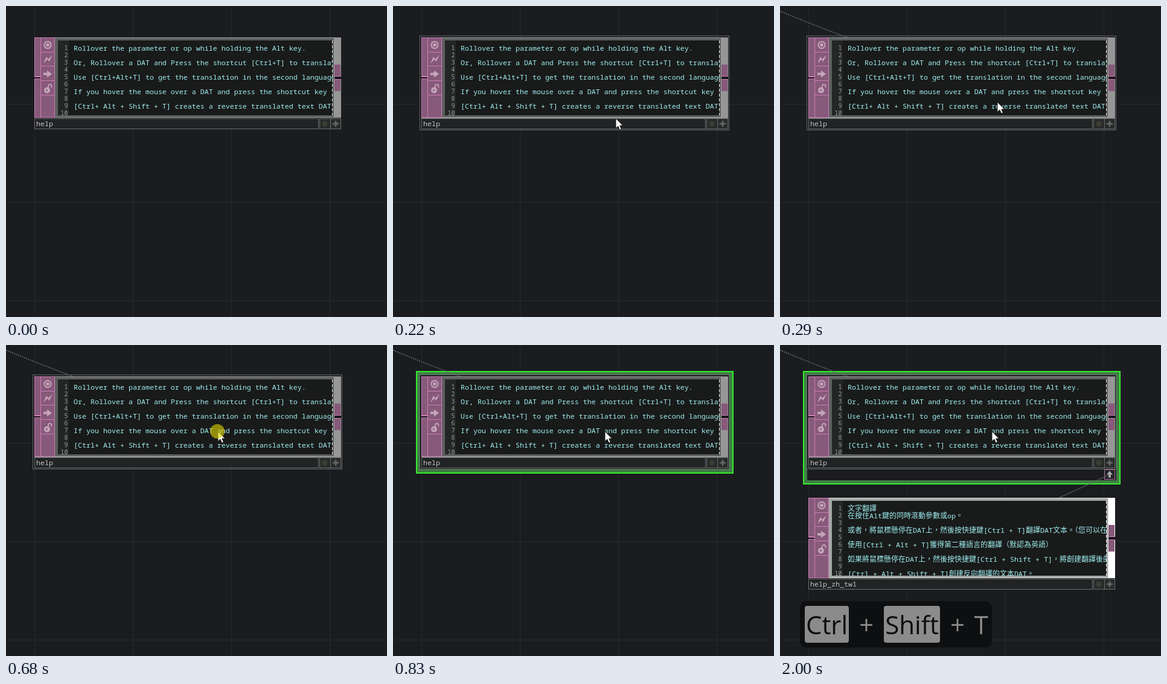
An HTML page that plays this animation: 631 by 515 pixels, repeating every 5000 ms.

```html
<!DOCTYPE html>
<html lang="en">
<head>
<meta charset="utf-8">
<style>
html, body { margin: 0; width: 100%; height: 100%; overflow: hidden; background: #1b1c20; }
svg { display: block; }
text { white-space: pre; }
.code { font: 11.667px "Noto Sans Mono", "DejaVu Sans Mono", monospace; fill: #9feef0; }
.cjk { font: 12px "Noto Sans CJK TC", "Noto Sans CJK JP", "Noto Sans CJK", sans-serif; }
.num { font: 10px "Noto Sans Mono", "DejaVu Sans Mono", monospace; fill: #9a9a9a; text-anchor: end; }
.big { font-size: 17px; fill: #4b4d4d; }
.name { font: 11.667px "Noto Sans Mono", "DejaVu Sans Mono", monospace; fill: #c4c4c4; }
.key { font: 42px "Open Sans", "Noto Sans", sans-serif; text-anchor: middle; }
</style>
</head>
<body>
<svg id="stage" width="631" height="515" viewBox="0 0 631 515"></svg>
<script>
const LOOP = 5000;
const PINK = '#87597a', EDGE = '#cc7fb6', ICON = '#c5a5bb';

const rect = (x, y, w, h, fill, more = '') =>
  `<rect x="${x}" y="${y}" width="${w}" height="${h}" fill="${fill}" ${more}/>`;
// One-pixel outline lying inside the box
const box = (x, y, w, h, fill, line) =>
  rect(x + .5, y + .5, w - 1, h - 1, fill, `stroke="${line}"`);
const path = (d, line, width = 1, more = '') =>
  `<path d="${d}" fill="none" stroke="${line}" stroke-width="${width}" ${more}/>`;
const text = (x, y, cls, s, more = '') => `<text x="${x}" y="${y}" class="${cls}" ${more}>${s}</text>`;
const group = (from, to, body) => `<g data-from="${from}" data-to="${to}">${body}</g>`;

const english = {
  1: 'Rollover the parameter or op while holding the Alt key.',
  3: 'Or, Rollover a DAT and Press the shortcut [Ctrl+T] to translate',
  5: 'Use [Ctrl+Alt+T] to get the translation in the second language',
  7: 'If you hover the mouse over a DAT and press the shortcut key [Ctrl',
  9: '[Ctrl+ Alt + Shift + T] creates a reverse translated text DAT.'
};
const chinese = {
  1: '文字翻譯',
  2: '在按住Alt鍵的同時滾動參數或op。',
  4: '或者，將鼠標懸停在DAT上，然後按快捷鍵[Ctrl + T]翻譯DAT文本。（您可以在',
  6: '使用[Ctrl + Alt + T]獲得第二種語言的翻譯（默認為英語）',
  8: '如果將鼠標懸停在DAT上，然後按快捷鍵[Ctrl + Shift + T]，將創建翻譯後的',
  10: '[Ctrl + Alt + Shift + T]創建反向翻譯的文本DAT。'
};
const mixed = s => s.replace(/[^\x00-\x7f]+/g, run => `<tspan class="cjk">${run}</tspan>`);

function page(lines) {
  let out = '';
  for (let i = 1; i <= 10; i++) {
    const y = 62 + 12 * i;
    out += text(102.5, y - 1, 'num', i);
    if (lines[i]) out += text(112, y, 'code', mixed(lines[i]));
  }
  return `<g clip-path="url(#view)">${out}</g>` +
    path('M540.5 57V181', '#e4e4e4', 1, 'stroke-dasharray="5 3"');
}

function blankPage() {
  let out = '';
  for (let i = 1; i <= 6; i++)
    out += text(100.5, 60 + 20 * i, 'num big', i, i === 1 ? 'style="fill:#9a9a9a"' : '');
  return `<g clip-path="url(#view)">${out}</g>`;
}

function icons() {
  return `<circle cx="69" cy="64.5" r="5.6" fill="none" stroke="${ICON}" stroke-width="2"/>
    <circle cx="69" cy="64.5" r="2.8" fill="${ICON}"/>
    <path d="M62 95L67 84L70 88L77 81L71.500 92L68.500 88.500Z" fill="${ICON}"/>
    <path d="M62 110.500H68V106.500L76 112.500L68 118.500V114.500H62Z" fill="${ICON}"/>
    <circle cx="68" cy="139.500" r="5" fill="${ICON}"/>
    ${path('M70 135V132.500A2.700 2.700 0 0 1 75.400 132.500V135', ICON, 1.8)}
    <circle cx="67.500" cy="139.500" r="1.4" fill="${PINK}"/>`;
}

function node(label, frame, side, line) {
  let out = rect(47, 52, 508, 133, '#1b1c20');
  for (const y of [52, 120]) out += box(47, y, 11, 65, PINK, EDGE);
  out += rect(47, 117, 10, 1, EDGE) + rect(47, 118, 10, 2, '#111');
  out += box(57, 52, 24, 133, PINK, EDGE);
  for (const y of [76, 99, 123, 147]) out += rect(57, y, 24, 1, EDGE);
  out += icons();
  out += rect(81, 52, 474, 133, frame) + rect(81, 52, 474, 1, line) + rect(81, 184, 474, 1, line);
  out += rect(86, 57, 455, 124, '#191a1a') + rect(86, 57, 18, 124, '#242626');
  out += rect(543, 52, 12, 133, side) + rect(543, 52, 1, 133, line);
  out += rect(544, 97, 10, 20, PINK) + rect(544, 121, 10, 20, PINK);
  out += rect(544, 117, 11, 4, '#151518') + rect(544, 116, 11, 1, EDGE) + rect(544, 121, 11, 1, EDGE);
  out += box(47, 186, 471, 18, '#212325', '#6b6d6d');
  out += box(519, 186, 19, 18, '#292b2b', '#6b6d6d') + box(537, 186, 18, 18, '#292b2b', '#6b6d6d');
  out += `<circle cx="528" cy="195" r="4.5" fill="#3b3e32"/>
    <path d="M546 189.500L547.500 193.500L551.500 195L547.500 196.500L546 200.500L544.500 196.500L540.500 195L544.500 193.500Z"
      fill="#626464" stroke="#626464"/>`;
  return out + text(50, 199, 'name', label);
}

// Green selection frame: bright line, dull band, dark gap
const selection = h => rect(38, 43, 526, h, '#32ef2c') + rect(40, 45, 522, h - 4, '#417d45') +
  rect(45, 50, 512, h - 14, '#1b1c20');

const keycap = (x, w, s) => rect(x, 432, w, 61, '#8b8b8b', 'rx="4"') +
  text(x + w / 2, 478.5, 'key', s, 'fill="#0d0d0e"');

let grid = '';
for (let i = 0; i < 4; i++) grid += rect(47 + 163 * i, 0, 1, 515, '#28292d');
for (let i = 0; i < 3; i++) grid += rect(0, 162 + 163 * i, 631, 1, '#28292d');

const arrowBox = box(537, 206, 18, 17, '#222426', '#b070a0') +
  '<path d="M546 208.500L551 214.500H548V219.500H544V214.500H541Z" fill="#a9a9a9"/>';
const hover = box(44, 49, 513, 157, 'none', '#636565');
const hoverEdge = path('M47 185.500H555', '#8c8e8e');

document.getElementById('stage').innerHTML = `
  <defs><clipPath id="view"><rect x="86" y="57" width="455" height="124"/></clipPath></defs>
  ${rect(0, 0, 631, 515, '#1b1c20')}
  <g shape-rendering="crispEdges">${grid}</g>
  ${group(830, 1920, selection(170))}
  ${group(1920, LOOP, selection(188))}
  ${group(290, LOOP, path('M0 8.500Q56 32 114 53', '#68696b', 1.8, 'stroke-dasharray="1.8 1.8"'))}
  ${group(220, LOOP, hover)}
  ${node('help', '#5d5f5f', '#969696', '#a2a4a4')}
  ${page(english)}
  ${group(220, LOOP, hoverEdge)}
  ${group(1920, LOOP, arrowBox + path('M545 215L460 254', '#6a6c6c', 1.5, 'opacity=".6"') +
    `<g transform="translate(0 201)">
      ${node('help_zh_tw1', '#a5a7a7', '#fff', '#e6e6e6')}
      ${group(1920, 2000, blankPage())}
      ${group(2000, LOOP, page(chinese))}
    </g>` +
    rect(33, 424, 318, 77, '#0e0f10', 'rx="11"') +
    keycap(41, 73, 'Ctrl') + keycap(172, 93, 'Shift') +
    text(143, 478.5, 'key', '+', 'fill="#8b8b8b"') +
    text(294, 478.5, 'key', '+', 'fill="#8b8b8b"') +
    text(333, 478.5, 'key', 'T', 'fill="#8b8b8b"'))}
  <path id="cursor" d="M0 0V16.500L3.800 13L6.500 19L9.300 17.800L6.700 12H11.700Z" fill="#fff" stroke="#111" stroke-width=".9"/>
  ${group(680, 830, '<circle cx="350" cy="143" r="12" fill="#dcd400" opacity=".62"/>')}`;

// Pointer: [time, x, y], each place held until the next
const moves = [[70, 392, 417], [140, 380, 282], [220, 369, 186], [290, 360, 159], [370, 353, 146], [450, 351, 143]];
const cursor = document.getElementById('cursor');
const parts = [...document.querySelectorAll('[data-from]')];

function draw(t) {
  for (const p of parts)
    p.style.display = t >= +p.dataset.from && t < +p.dataset.to ? '' : 'none';
  const at = moves.filter(m => m[0] <= t).pop();
  cursor.style.display = at ? '' : 'none';
  if (at) cursor.setAttribute('transform', `translate(${at[1]} ${at[2]})`);
}

const start = performance.now();
function tick() {
  draw((performance.now() - start) % LOOP);
  requestAnimationFrame(tick);
}
tick();
</script>
</body>
</html>
```
